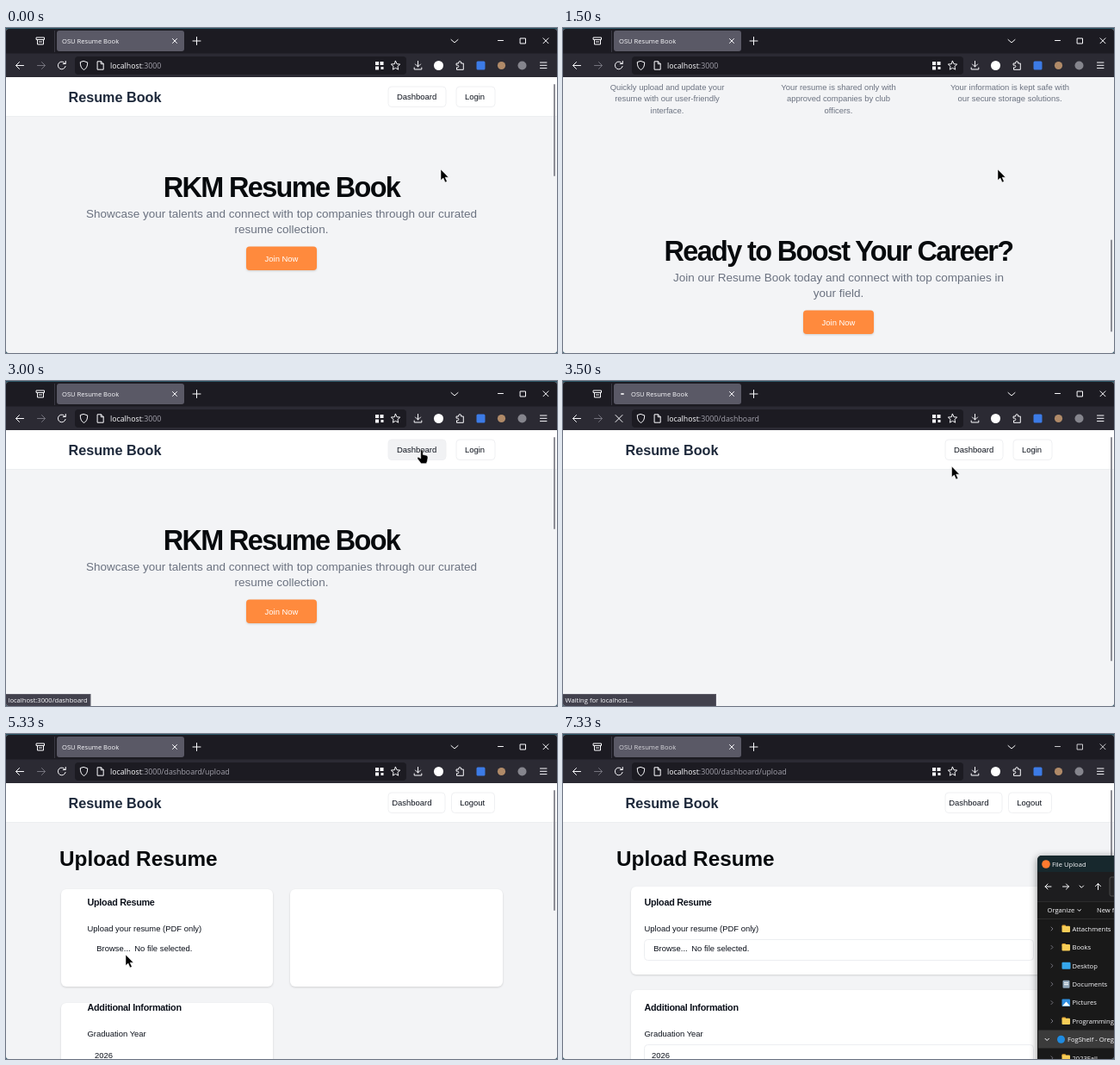
An HTML page for the animation above (8000 ms loop, 640 px wide and 377 px high).

```html
<!DOCTYPE html>
<html lang="en">
<head>
<meta charset="utf-8">
<title>Resume Book</title>
<style>
html, body { margin: 0; width: 100%; height: 100%; overflow: hidden; background: #2b5566; }
svg { display: block; width: 640px; height: 377px; clip-path: inset(1px 0 0 0 round 3px); }
text { font-family: "Liberation Sans", Arial, sans-serif; font-size: 9.45px; fill: #0c111b; white-space: pre; }
.ui text { font-family: "Open Sans", "Noto Sans", sans-serif; font-size: 7.6px; fill: #fbfbfe; }
.ui .url { font-size: 8.8px; }
.ui .soft { fill: #a3a2ac; }
.mid { text-anchor: middle; }
.hero { font-weight: 700; font-size: 32.4px; letter-spacing: -1.62px; fill: #070a0d; }
.lead { font-size: 13.5px; fill: #6b7280; }
.note { fill: #6b7280; }
.brand { font-weight: 700; font-size: 16.2px; fill: #1e293b; }
.feat { font-weight: 700; font-size: 13.5px; }
.h1 { font-weight: 700; font-size: 24.3px; fill: #070a0d; }
.h3 { font-weight: 700; font-size: 10.8px; letter-spacing: -.27px; }
.white { fill: #fff; }
.line { fill: none; stroke: #fbfbfe; stroke-width: 1; stroke-linecap: round; stroke-linejoin: round; }
.dim { stroke: #74737d; }
.icon { fill: none; stroke: #f5853a; stroke-width: 2; stroke-linecap: round; stroke-linejoin: round; }
.card { fill: #fff; filter: drop-shadow(0 1px 1px rgba(0, 0, 0, .14)); }
.field { fill: none; stroke: #eceef1; }
.nav { fill: #fff; stroke: #eff0f2; }
.cta { fill: #ff8a3d; filter: drop-shadow(0 1px 1px rgba(0, 0, 0, .15)); }
</style>
</head>
<body>
<svg id="stage" viewBox="0 0 640 377"></svg>
<script>
const STEP = 1000 / 6, STEPS = 48;

const text = (x, y, s, cls = '', id = '') =>
  `<text x="${x}" y="${y}" class="${cls}"${id && ` id="${id}"`}>${s}</text>`;
const lines = (x, y, gap, cls, rows) => rows.map((s, i) => text(x, y + i * gap, s, cls)).join('');
const box = (x, y, w, h, r, cls, id = '') =>
  `<rect x="${x}" y="${y}" width="${w}" height="${h}" rx="${r}" class="${cls}"${id && ` id="${id}"`}/>`;
const fill = (x, y, w, h, color, r = 0) =>
  `<rect x="${x}" y="${y}" width="${w}" height="${h}" rx="${r}" fill="${color}"/>`;
const dot = (x, y, r, color) => `<circle cx="${x}" cy="${y}" r="${r}" fill="${color}"/>`;
const path = (d, cls = 'line') => `<path d="${d}" class="${cls}"/>`;
const group = (id, body, cls = '') => `<g id="${id}" class="${cls}">${body}</g>`;
const button = (y, s) => box(279, y, 82, 27.5, 4, 'cta') + text(320, y + 17, s, 'mid white');

const features = [
  [121, 'Easy Upload', ['Quickly upload and update your', 'resume with our user-friendly', 'interface.'],
    'M15 2H6a2 2 0 0 0-2 2v16a2 2 0 0 0 2 2h12a2 2 0 0 0 2-2V7ZM14 2v4a2 2 0 0 0 2 2h4M10 9H8M16 13H8M16 17H8'],
  [320, 'Exclusive Access', ['Your resume is shared only with', 'approved companies by club', 'officers.'],
    'M16 21v-2a4 4 0 0 0-4-4H6a4 4 0 0 0-4 4v2M5 7a4 4 0 1 0 8 0a4 4 0 1 0-8 0M22 21v-2a4 4 0 0 0-3-3.9M16 3.1a4 4 0 0 1 0 7.8'],
  [519, 'Secure Storage', ['Your information is kept safe with', 'our secure storage solutions.'],
    'M5 11h14a2 2 0 0 1 2 2v7a2 2 0 0 1-2 2H5a2 2 0 0 1-2-2v-7a2 2 0 0 1 2-2ZM7 11V7a5 5 0 0 1 10 0v4']
];

const home = group('home',
  text(320, 195.5, 'RKM Resume Book', 'hero mid') +
  lines(320, 219.5, 18.9, 'lead mid', ['Showcase your talents and connect with top companies through our curated', 'resume collection.']) +
  button(253.5, 'Join Now') +
  text(320, 436, 'Features', 'hero mid') +
  features.map(([x, title, rows, d]) =>
    `<g transform="translate(${x - 13.5} 474.5) scale(1.125)">${path(d, 'icon')}</g>` +
    text(x, 531, title, 'feat mid') + lines(x, 551.5, 13.5, 'note mid', rows)).join('') +
  text(320, 749.5, 'Ready to Boost Your Career?', 'hero mid') +
  lines(320, 773.5, 18.9, 'lead mid', ['Join our Resume Book today and connect with top companies in', 'your field.']) +
  button(807.5, 'Join Now'));

const header = group('header',
  fill(0, 102, 640, 1, '#eceef0') + '<rect id="band" y="40" width="640" height="62"/>' +
  text(72.5, 85.5, 'Resume Book', 'brand') +
  group('guest', box(444, 68, 67, 23.5, 4, 'nav', 'dashLink') + text(454, 83, 'Dashboard') +
    box(523, 68, 45, 23.5, 4, 'nav') + text(533, 83, 'Login')) +
  group('member', box(444, 68, 66, 23.5, 4, 'nav') + text(448.3, 83, 'Dashboard') +
    box(517.5, 68, 50, 23.5, 4, 'nav') + text(527.3, 83, 'Logout')));

const dashboard =
  group('dashCards', box(64, 180, 246, 113, 6, 'card') + box(330, 180, 247, 113, 6, 'card') + box(64, 312, 246, 113, 6, 'card')) +
  group('dashText',
    text(62, 152.5, 'Dashboard', 'h1') +
    text(79, 204, 'Upload Resume', 'h3') + text(79, 220, 'Add or update your resume', 'note') +
    box(78, 253, 112, 25, 4, 'cta') + text(134, 269, 'Upload New Resume', 'mid white') +
    text(345, 204, 'Current Resume', 'h3') + text(345, 220, 'Your most recently saved resume', 'note') +
    text(345, 251, 'my_resume_sample.pdf') + text(520, 251, 'Preview') +
    text(345, 273, 'Saved') + text(520, 273, 'Remove') +
    text(79, 336, 'Profile Status', 'h3') + text(79, 352, 'Your resume is visible to employers', 'note'));

const upload =
  group('upCards', box(79, 177, 484, 102, 6, 'card') + box(79, 297, 484, 120, 6, 'card') +
    box(94.5, 238.5, 452, 24, 4, 'field') + box(94.5, 360.5, 452, 24, 4, 'field')) +
  group('upText',
    text(62, 152.5, 'Upload Resume', 'h1') +
    text(94.5, 199, 'Upload Resume', 'h3') + text(94.5, 229, 'Upload your resume (PDF only)') +
    text(105.3, 252, 'Browse...') + text(149.3, 252, 'No file selected.') +
    text(94.5, 321, 'Additional Information', 'h3') + text(94.5, 350.5, 'Graduation Year') + text(103, 375.5, '2026'));

const chrome = group('chrome',
  fill(0, 0, 640, 30, '#1c1b22') + fill(0, 29.5, 640, 27.5, '#2b2a33') + fill(56, 3, 1, 25, '#3a3943') +
  fill(59, 3, 148, 24, '#5a5966', 3) + text(65, 18.3, 'OSU Resume Book', '', 'tab') +
  `<ellipse id="spin" cy="15" rx="2.2" ry="1.1" fill="#e6e6ea"/>` +
  path('M35.5 11h9v2.5h-9zM36.5 13.5v5.5h7v-5.5M38.5 16h3') +
  path('M193.5 12.5l5 5m0-5l-5 5M217 15h9m-4.5-4.5v9M517 13.5l4 3.5 4-3.5') +
  group('winKeys', path('M571.5 14.5h6M597.5 12h6v6h-6zM624 11.8l6 6m0-6l-6 6')) +
  path('M20.5 43.5h-9m4-4l-4 4 4 4') + path('M36.5 43.5h9m-4-4l4 4-4 4', 'line dim') +
  group('reload', path('M68.5 41a4.4 4.4 0 1 0 .6 3.5M69.3 38.5v3h-3')) +
  group('stop', path('M61 39.5l8 8m0-8l-8 8')) +
  fill(80, 33, 385, 21, '#1c1b22', 4) +
  path('M90.5 38.5l4.2 1.4c0 4.5-1.2 7-4.2 8.6c-3-1.6-4.2-4.1-4.2-8.6z') +
  path('M106.5 38.8h4l2.7 2.7v6.7h-6.7zM110.3 39v2.7h2.7') +
  `<text x="121" y="46.7" class="url">localhost<tspan class="soft">:3000</tspan><tspan class="soft" id="route"></tspan></text>` +
  fill(429, 39, 4, 4, '#fbfbfe') + fill(434.5, 39, 4, 4, '#fbfbfe') + fill(429, 44.5, 4, 4, '#fbfbfe') + fill(435.5, 45, 3, 3, '#fbfbfe') +
  path('M452.5 38.3l1.5 3.4 3.7.4-2.8 2.5.8 3.6-3.2-1.8-3.2 1.8.8-3.6-2.8-2.5 3.7-.4z') +
  path('M478.5 38.5v6.5m-3-3l3 3 3-3M474.2 46v2h8.6v-2') +
  dot(502.5, 43.5, 5.5, '#fff') +
  path('M523.5 41h2.3v-1a1.4 1.4 0 0 1 2.8 0v1h2.7v7.3h-7.8v-2.5h1a1.3 1.3 0 0 0 0-2.6h-1z') +
  fill(546.5, 38.5, 10, 10, '#3c7be6', 1.5) + dot(575.5, 43.5, 4.6, '#b08a68') + dot(599.5, 43.5, 5, '#85858d') +
  path('M620.5 40h7.5m-7.5 3.3h7.5m-7.5 3.3h7.5'), 'ui');

const status = group('status', '<rect id="statusBox" x="-1" y="363.5" height="16" fill="#42414d" stroke="#5b5a66"/>' +
  text(2.5, 373.3, '', '', 'statusText'), 'ui');

const folder = y => fill(579.5, y - 4.5, 4.5, 3, '#e0a030', 1) + fill(579.5, y - 3.3, 9.5, 7.3, '#f7cd57', 1);
const places = [
  ['Attachments', folder], ['Books', folder],
  ['Desktop', y => fill(579.5, y - 4, 10, 8, '#36a7ec', 1)],
  ['Documents', y => fill(580.5, y - 4.5, 8, 9, '#8fa5b8', 1) + fill(582, y - 2, 5, 1, '#fff') + fill(582, y, 5, 1, '#fff')],
  ['Pictures', y => fill(579.5, y - 4.2, 9.5, 8.5, '#2f8fe0', 1) + `<path d="M580 ${y + 4}l4.5-5 4.5 5z" fill="#fff"/>`],
  ['Programming', folder]
];
const rowY = i => 226 + i * 21.4;
const dialog = group('dialog',
  fill(551, 141, 110, 260, '#191919', 5) + fill(551, 141, 110, 22, '#17282d', 5) + fill(551, 160, 110, 35, '#1d1d1f') +
  fill(551, 194, 110, 1, '#2c2c2c') + dot(561, 151, 4.8, '#ff7a2f') + text(568, 154, 'File Upload') +
  path('M567 177h-7m3-3l-3 3 3 3M580.5 177h7m-3-3l3 3-3 3M600 176l2.3 2.3 2.3-2.3M621.5 180.5v-7m-3 3l3-3 3 3') +
  '<rect x="635" y="166" width="30" height="22" rx="2" fill="#252527" stroke="#4a4a4a"/>' +
  group('tree',
    text(562.5, 207, 'Organize') + path('M598 203.7l1.7 1.7 1.7-1.7') + text(620, 207, 'New folder') +
    fill(551, 214, 110, 1, '#2c2c2c') +
    places.map(([name, icon], i) => path(`M567 ${rowY(i) - 2}l2 2-2 2`, 'line dim') + icon(rowY(i)) + text(591.5, rowY(i) + 2.8, name)).join('') +
    fill(552, 343.5, 100, 21, '#3b3b3b') + path('M560 353.3l2.2 2.2 2.2-2.2') + dot(578.5, 354.3, 4.5, '#1f8be0') +
    text(586, 357, 'FogShelf - Oregon') +
    path('M567 373.8l2 2-2 2', 'line dim') + folder(375.8) + text(591.5, 378.5, '2023Fall')), 'ui');

const pointer = group('pointer',
  '<path id="arrow" d="M0 0v12.6l2.9-2.6 2.2 5 2.2-1-2.2-4.8h3.9z" stroke="#fff" stroke-width=".5"/>' +
  '<path id="hand" d="M-1.3 1a1.3 1.3 0 0 1 2.6 0v4.4l4 .9q2 .6 1.7 2.8l-.8 4.2-1 2.4h-6l-4.2-5.5q-.8-1.8 1-1.9l2.7 1.6z" stroke="#fff" stroke-width=".5"/>');

document.getElementById('stage').innerHTML =
  fill(0, 0, 640, 377, '#f3f4f6') + group('page', home + header + dashboard + upload) +
  '<rect id="thumb" x="636" width="2" rx="1" fill="#8c8d95"/>' + status + chrome + dialog + pointer;

const $ = Object.fromEntries([...document.querySelectorAll('[id]')].map(e => [e.id, e]));
const set = (e, o) => Object.entries(o).forEach(([k, v]) => e.setAttribute(k, v));
const show = (on, ...els) => els.forEach(e => e.style.display = on ? '' : 'none');

// Tables of [step, value...], linear in between.
const scrollKeys = [[3, 0], [4, 70], [5, 250], [6, 420], [7, 510], [8, 525], [9, 480], [10, 310], [11, 128], [12, -2.7], [13, -1], [14, 0]];
const mouseKeys = [[14, 505, 164], [16, 500, 128], [17, 490, 96], [18, 483, 80], [20, 483, 80], [22, 420, 118],
  [25, 275, 186], [27, 237, 199], [28, 215, 214], [30, 145, 254], [31, 139, 256]];

function at(keys, k) {
  const i = keys.findIndex(p => p[0] >= k);
  if (i <= 0) return (i ? keys[keys.length - 1] : keys[0]).slice(1);
  const a = keys[i - 1], b = keys[i], f = (k - a[0]) / (b[0] - a[0]);
  return a.slice(1).map((v, j) => v + (b[j + 1] - v) * f);
}

function draw(k) {
  const [scroll] = at(scrollKeys, k), [mx, my] = at(mouseKeys, k);
  const loading = k >= 20 && k < 28, blank = k >= 21, member = k >= 28, up = k >= 32;
  const hover = k >= 18 && k < 21, upHover = k === 30 || k === 31;

  set($.page, { transform: `translate(0 ${-scroll})` });
  set($.band, { fill: k > 10 && k < 14 ? '#f5f6f7' : '#fff' });
  set($.thumb, { y: 65 + Math.max(0, scroll) * .376, height: up ? 140 : blank ? 260 : 107 });
  show(!blank, $.home);
  show(!member, $.guest);
  show(member, $.member);
  show(member && k < 33, $.dashCards);
  show(member && !up, $.dashText);
  show(up, $.upText);
  show(k >= 33, $.upCards);
  $.dashLink.style.fill = hover ? '#f1f2f4' : '';

  $.route.textContent = up ? '/dashboard/upload' : blank ? '/dashboard' : '';
  set($.tab, { x: loading ? 79 : 65 });
  show(loading, $.spin, $.stop);
  show(!loading, $.reload);
  set($.spin, { cx: 72 + 3 * Math.sin((k - 27) * 1.3) });
  $.tab.style.opacity = $.winKeys.style.opacity = k >= 39 ? .78 : 1;

  const waiting = loading && blank;
  show(hover || waiting || upHover, $.status);
  $.statusText.textContent = waiting ? 'Waiting for localhost...' : 'localhost:3000/dashboard' + (upHover ? '/upload' : '');
  set($.statusBox, { width: waiting ? 178.5 : upHover ? 127 : 99 });

  show(k < 42, $.pointer);
  set($.pointer, { transform: `translate(${mx} ${my})` });
  show(hover || upHover, $.hand);
  show(!hover && !upHover, $.arrow);

  show(k >= 42, $.dialog);
  show(k >= 43, $.tree);
  const grow = Math.min(1, .96 + (k - 42) * .02);
  set($.dialog, { transform: `translate(${640 * (1 - grow)} ${300 * (1 - grow)}) scale(${grow})` });
  $.dialog.style.opacity = [.5, .9][k - 42] || 1;
  $.dialog.style.filter = 'drop-shadow(0 2px 5px rgba(0, 0, 0, .45))';
}

let last = -1;
function tick() {
  const k = Math.floor((performance.now() + 4) / STEP) % STEPS;
  if (k !== last) draw(last = k);
  requestAnimationFrame(tick);
}
tick();
</script>
</body>
</html>
```
